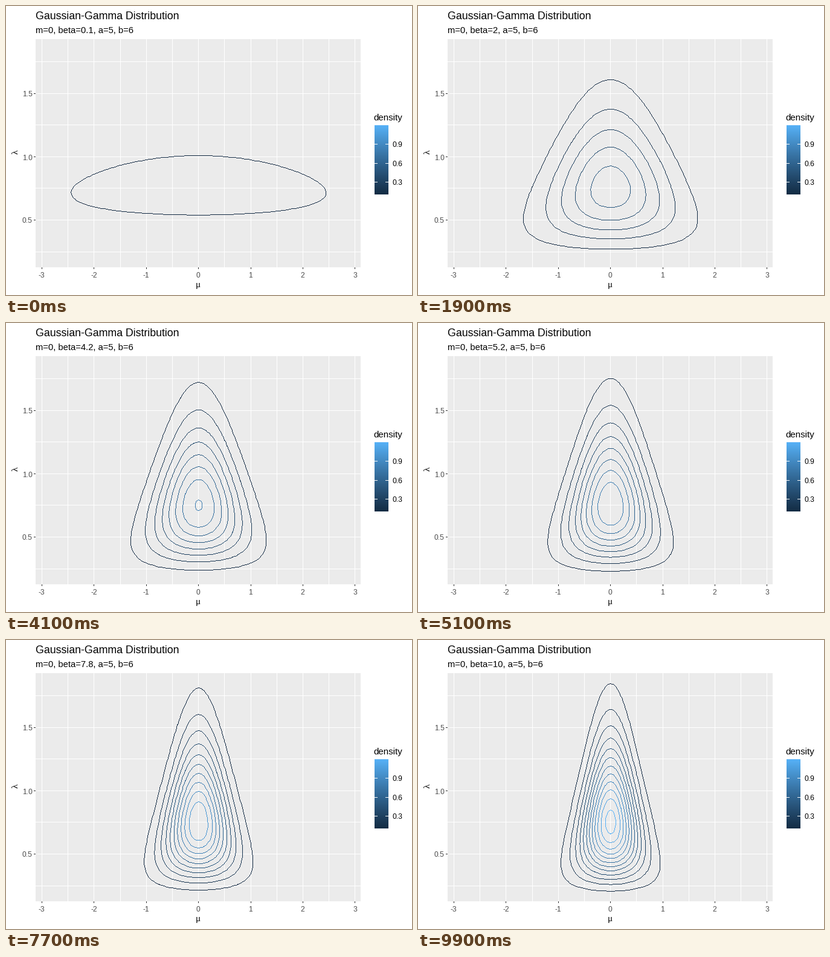
These frames come from a looping animation (672 px wide and 480 px high, 10 s). A matplotlib script:

```python
import numpy as np
import matplotlib.pyplot as plt
from matplotlib.animation import FuncAnimation
from matplotlib.patches import Rectangle

W, H, DPI = 672, 480, 96
FRAMES, INTERVAL = 100, 100
PX = 72 / DPI
LEFT, RIGHT, TOP, BOTTOM = 49, 587, 55, 434
MU_MAX = 3.113
LAM_MIN, LAM_MAX = 0.126, 1.9274
A, B = 5, 6
LEVELS = np.arange(1, 13) / 10

plt.rcParams["font.family"] = "Liberation Sans"

# Colour scale, interpolated in CIE Lab
RGB_XYZ = np.array([[0.4124564, 0.3575761, 0.1804375],
                    [0.2126729, 0.7151522, 0.0721750],
                    [0.0193339, 0.1191920, 0.9503041]])
WHITE = RGB_XYZ.sum(axis=1)
XYZ_LAB = np.array([[0, 116, 0], [500, -500, 0], [0, 200, -200]])


def to_lab(rgb):
    c = np.array(rgb) / 255
    lin = np.where(c > 0.04045, ((c + 0.055) / 1.055) ** 2.4, c / 12.92)
    t = RGB_XYZ @ lin / WHITE
    f = np.where(t > 0.008856, np.cbrt(t), 7.787 * t + 16 / 116)
    return XYZ_LAB @ f - [16, 0, 0]


def from_lab(lab):
    fy = (lab[0] + 16) / 116
    f = np.array([fy + lab[1] / 500, fy, fy - lab[2] / 200])
    t = np.where(f > 0.2069, f ** 3, (f - 16 / 116) / 7.787)
    lin = np.clip(np.linalg.solve(RGB_XYZ, t * WHITE), 0, 1)
    return np.where(lin > 0.0031308, 1.055 * lin ** (1 / 2.4) - 0.055, 12.92 * lin)


DARK, LIGHT = to_lab((0x13, 0x2B, 0x43)), to_lab((0x56, 0xB1, 0xF7))


def shade(density):
    t = (density - 0.1) / 1.1
    return tuple(np.clip(from_lab(DARK + (LIGHT - DARK) * t), 0, 1))


def px(mu):
    return 318.7 + mu * (RIGHT - LEFT) / (2 * MU_MAX)


def py(lam):
    return BOTTOM + 0.2 - (lam - LAM_MIN) * (BOTTOM - TOP) / (LAM_MAX - LAM_MIN)


fig = plt.figure(figsize=(W / DPI, H / DPI), dpi=DPI, facecolor="white")
ax = fig.add_axes([0, 0, 1, 1])
ax.axis("off")


def box(x, y, w, h, color, z=0):
    ax.add_patch(Rectangle((x, y), w, h, fc=color, lw=0, aa=False, zorder=z))


def text(x, y, s, size, color="black", **kw):
    return ax.text(x, y, s, fontsize=size * PX, color=color, **kw)


def hline(x, y, length, color):
    box(x, int(y), length, 1, color, 1)


def vline(x, y, length, color):
    box(int(x), y, 1, length, color, 1)


# Panel, grid and axes
box(LEFT, TOP, RIGHT - LEFT, BOTTOM - TOP, "#EBEBEB")
for mu in np.arange(-3, 3.1, 0.5):
    vline(px(mu), TOP, BOTTOM - TOP, "white")
for lam in np.arange(0.25, 1.8, 0.25):
    hline(LEFT, py(lam), RIGHT - LEFT, "white")
for mu in range(-3, 4):
    vline(px(mu), BOTTOM, 3, "#333333")
    text(px(mu) - 0.5, 451, str(mu), 12, "#4D4D4D", ha="center")
for lam in (0.5, 1.0, 1.5):
    hline(LEFT - 3, py(lam), 3, "#333333")
    text(43.5, int(py(lam)) + 5.5, f"{lam:.1f}", 12, "#4D4D4D", ha="right")
text(318, 467, "μ", 15, ha="center", family="Liberation Serif")
text(23, 242.4, "λ", 15, ha="right", va="center", rotation=90,
     family="Liberation Serif")
text(49, 22, "Gaussian-Gamma Distribution", 17.8)
subtitle = text(49, 45, "", 14.75)

# Colour bar
BAR_X, BAR_Y, BAR_W, BAR_H = 610, 198, 23, 115
text(608.5, 190, "density", 15)
for k in range(BAR_H):
    box(BAR_X, BAR_Y + k, BAR_W, 1, shade(1.2 - 1.1 * (k + 0.5) / BAR_H))
for d in (0.3, 0.6, 0.9):
    y = round(BAR_Y + BAR_H * (1.2 - d) / 1.1)
    hline(BAR_X, y, 5, "white")
    hline(BAR_X + BAR_W - 5, y, 5, "white")
    text(640, y + 5, f"{d}", 12)

MU, LAM = np.meshgrid(np.linspace(-3, 3, 121), np.linspace(0.02, 2, 100))
GAMMA = B ** A / 24 * LAM ** (A - 1) * np.exp(-B * LAM)
COLORS = [shade(v) for v in LEVELS]
canvas = np.zeros((H, W, 4))
curves = ax.imshow(canvas, extent=(0, W, H, 0), aspect="auto",
                   interpolation="nearest", zorder=3)


def trace(points, color):
    """Draw a one-pixel polyline without smoothing."""
    p = np.floor(points)
    step = np.diff(p, axis=0)
    n = np.maximum(np.abs(step).max(axis=1), 1)
    t = np.minimum(np.arange(n.max() + 1) / n[:, None], 1)
    xy = p[:-1, None] + t[..., None] * step[:, None]
    x, y = np.floor(xy + 0.5).astype(int).reshape(-1, 2).T
    canvas[y, x] = (*color, 1)


def update(i):
    beta = (i + 1) / 10
    prec = beta * LAM
    density = np.sqrt(prec / (2 * np.pi)) * np.exp(-prec * MU ** 2 / 2) * GAMMA
    n = np.count_nonzero(LEVELS < density.max())
    lines = ax.contour(px(MU), py(LAM), density, levels=LEVELS[:n])
    canvas[:] = 0
    for segs, color in zip(lines.allsegs, COLORS):
        for seg in segs:
            trace(seg, color)
    lines.remove()
    curves.set_data(canvas)
    ax.set(xlim=(0, W), ylim=(H, 0))
    subtitle.set_text(f"m=0, beta={beta:g}, a={A}, b={B}")
    return [curves, subtitle]


anim = FuncAnimation(fig, update, frames=FRAMES, interval=INTERVAL,
                     init_func=lambda: [], repeat=True, repeat_delay=0)
plt.show()
```
